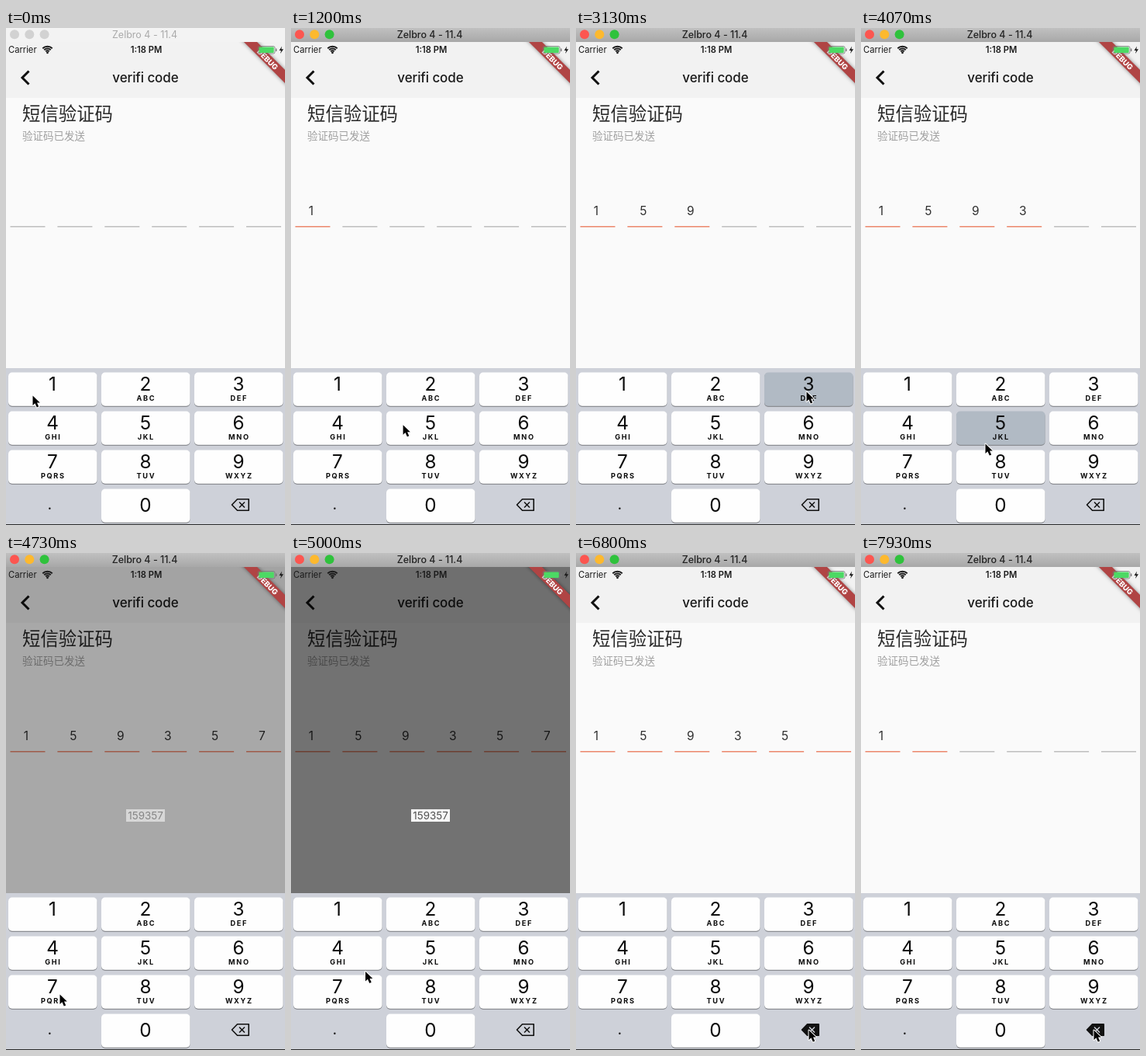
Animation, 360 px wide and 640 px high, one loop 8 s. Source, as an HTML page with a canvas:

```html
<!DOCTYPE html>
<html lang="en">
<head>
<meta charset="utf-8">
<title>verifi code</title>
<style>
html, body { margin: 0; width: 100%; height: 100%; overflow: hidden; background: #fafafa; }
canvas { display: block; width: 360px; height: 640px; }
</style>
</head>
<body>
<canvas id="stage" width="360" height="640"></canvas>
<script>
const ctx = document.getElementById('stage').getContext('2d');
const LOOP = 8000;
const SANS = 'Inter, "Liberation Sans", sans-serif';
const CJK = '"Noto Sans CJK SC", "Noto Sans CJK", sans-serif';
const INK = '#1a1a1a';
const KEYBOARD = '#ced1d9';

const CODE = '159357';
const typedAt = [800, 1600, 2330, 3230, 4120, 4640];
const deletedAt = [6770, 7070, 7350, 7620, 7900];
const windowActiveAt = 450;
const dialogOpen = 4640, dialogClose = 6130, fade = 150;
const keyLetters = ['', 'ABC', 'DEF', 'GHI', 'JKL', 'MNO', 'PQRS', 'TUV', 'WXYZ'];

// time, x, y of the pointer's tip
const pointerPath = [
  [0, 34, 473], [850, 34, 473], [1350, 174, 521], [1650, 174, 521],
  [2080, 287, 570], [2380, 287, 570], [2950, 297, 468], [3300, 297, 468],
  [3900, 160, 535], [4150, 160, 535], [4470, 69, 568], [4850, 69, 568],
  [5500, 263, 352], [6160, 263, 352], [6650, 300, 614], [8000, 300, 614]
];

const clamp = v => Math.max(0, Math.min(1, v));

function pointerAt(t) {
  const i = pointerPath.findIndex(p => p[0] > t);
  const [t0, x0, y0] = pointerPath[i - 1], [t1, x1, y1] = pointerPath[i];
  const k = (t - t0) / (t1 - t0), e = k * k * (3 - 2 * k);
  return [x0 + (x1 - x0) * e, y0 + (y1 - y0) * e];
}

function rect(x, y, w, h, color) {
  ctx.fillStyle = color;
  ctx.fillRect(x, y, w, h);
}

function rounded(x, y, w, h, r, color) {
  ctx.fillStyle = color;
  ctx.beginPath();
  ctx.roundRect(x, y, w, h, r);
  ctx.fill();
}

function disc(x, y, r, color) {
  ctx.fillStyle = color;
  ctx.beginPath();
  ctx.arc(x, y, r, 0, Math.PI * 2);
  ctx.fill();
}

function line(points, color, width, close) {
  ctx.beginPath();
  points.forEach(p => ctx.lineTo(...p));
  if (close) ctx.closePath();
  ctx.strokeStyle = color;
  ctx.lineWidth = width;
  ctx.stroke();
}

function text(str, x, y, size, { weight = 400, color = INK, align = 'center', family = SANS, spacing = 0 } = {}) {
  ctx.font = `${weight} ${size}px ${family}`;
  ctx.letterSpacing = spacing + 'px';
  ctx.textAlign = align;
  ctx.fillStyle = color;
  ctx.fillText(str, x + (align === 'center' ? spacing / 2 : 0), y);
}

function drawTitleBar(active) {
  const shade = ctx.createLinearGradient(0, 0, 0, 18);
  shade.addColorStop(0, '#c0c0c0');
  shade.addColorStop(1, '#a8a8a8');
  rect(0, 0, 360, 18, active ? shade : '#f3f3f3');
  const lights = active ? ['#fc5650', '#fdb92e', '#2fc23c'] : ['#d2d2d2', '#d2d2d2', '#d2d2d2'];
  lights.forEach((c, i) => disc(11 + i * 19.3, 8.3, 6, c));
  text('Zelbro 4 - 11.4', 179, 13, 12.5, { weight: active ? 500 : 400, color: active ? '#222' : '#aaa' });
}

function drawPage(count, lit) {
  rect(0, 18, 360, 420, '#fafafa');
  rect(0, 18, 360, 72, '#f2f2f2');
  line([[29.5, 55.5], [21, 64], [29.5, 72.5]], '#111', 3);
  text('verifi code', 180, 70, 17, { weight: 500, spacing: -0.1 });
  text('短信验证码', 21, 119, 23.4, { align: 'left', family: CJK, color: '#282828' });
  text('验证码已发送', 21, 144, 13.5, { align: 'left', family: CJK, color: '#a0a0a0' });
  for (let i = 0; i < 6; i++) {
    rect(5.5 + i * 60.9, 255, 45, 1.5, i < lit ? '#ec876c' : '#bebebe');
    if (i < count) text(CODE[i], 26 + i * 60.9, 241, 15.5, { color: '#303030' });
  }
}

function drawDialog(alpha) {
  ctx.fillStyle = `rgba(0,0,0,${0.54 * alpha})`;
  ctx.fillRect(0, 18, 360, 420);
  ctx.globalAlpha = alpha;
  rect(155, 330, 50, 16, '#f6f6f6');
  text(CODE, 180, 343, 13.4, { color: '#505050' });
  ctx.globalAlpha = 1;
}

function drawBanner() {
  ctx.save();
  ctx.beginPath();
  ctx.rect(0, 18, 360, 70);
  ctx.clip();
  ctx.translate(360, 18);
  ctx.rotate(Math.PI / 4);
  ctx.shadowColor = 'rgba(0,0,0,.45)';
  ctx.shadowBlur = 5;
  rect(-50, 25.5, 100, 12, '#b04444');
  ctx.shadowBlur = 0;
  text('DEBUG', 0, 35.2, 9.6, { weight: 800, color: '#fff' });
  ctx.restore();
}

function drawStatus() {
  text('Carrier', 3, 32, 11.2, { align: 'left' });
  text('1:18 PM', 181, 32, 11.2, { weight: 600 });
  for (const r of [3.2, 6, 8.8]) {
    ctx.beginPath();
    ctx.arc(53.5, 32.5, r, -Math.PI * 0.75, -Math.PI * 0.25);
    ctx.strokeStyle = INK;
    ctx.lineWidth = 1.9;
    ctx.stroke();
  }
  disc(53.5, 31.8, 1.4, INK);
  ctx.beginPath();
  ctx.roundRect(325, 23.5, 22, 9.5, 2);
  ctx.strokeStyle = '#777';
  ctx.lineWidth = 0.8;
  ctx.stroke();
  rounded(326.3, 24.6, 19.4, 7.4, 1, '#4cd964');
  rect(348, 26.5, 1.3, 3.5, '#777');
  ctx.fillStyle = INK;
  ctx.beginPath();
  [[356, 23.5], [352.5, 29], [355, 29], [354, 33], [358, 27.3], [355.3, 27.3]].forEach(p => ctx.lineTo(...p));
  ctx.fill();
}

function drawKey(label, letters, col, row, pressed) {
  const x = 3 + col * 120, y = 443.5 + row * 50, cx = x + 57;
  rounded(x, y + 1, 114.5, 43.5, 5, '#8b8d92');
  rounded(x, y, 114.5, 43.2, 5, pressed ? '#b1bac4' : '#fefefe');
  text(label, cx, y + (row === 3 ? 29 : 23.4), 24.3, { color: '#0c0c0c' });
  text(letters, cx, y + 36, 9.2, { weight: 700, spacing: 1.7, color: '#0c0c0c' });
}

function drawBackspace(pressed) {
  const shape = [[291.5, 614], [298.5, 606.7], [313.2, 606.7], [313.2, 621.3], [298.5, 621.3]];
  ctx.lineJoin = 'round';
  line(shape, '#111', 1.6, true);
  if (pressed) { ctx.fillStyle = '#111'; ctx.fill(); }
  const cross = pressed ? KEYBOARD : '#111';
  line([[301, 610.5], [308, 617.5]], cross, 1.5);
  line([[308, 610.5], [301, 617.5]], cross, 1.5);
  ctx.lineJoin = 'miter';
}

function drawKeyboard(t) {
  rect(0, 438, 360, 202, KEYBOARD);
  const current = typedAt.findIndex(at => t >= at - 110 && t < at);
  for (let n = 1; n <= 9; n++)
    drawKey(n, keyLetters[n - 1], (n - 1) % 3, Math.floor((n - 1) / 3), CODE[current] === String(n));
  drawKey(0, '', 1, 3, false);
  text('.', 56.5, 620, 20);
  drawBackspace(deletedAt.some(at => t >= at && t < at + 110));
  rect(0, 639, 360, 1, '#2a2a2a');
}

function drawPointer([x, y]) {
  ctx.save();
  ctx.translate(x, y);
  ctx.lineJoin = 'round';
  line([[0.5, 0.5], [0.5, 13], [3.4, 10.3], [5.8, 15.5], [8.2, 14.4], [6, 9.5], [9.8, 9.5]], '#fff', 2, true);
  ctx.fillStyle = '#000';
  ctx.fill();
  ctx.restore();
}

function render(t) {
  const typed = typedAt.filter(at => t >= at).length;
  const deleted = deletedAt.filter(at => t >= at).length;
  const count = typed - deleted;
  const dim = clamp((t - dialogOpen) / fade) * clamp(1 - (t - dialogClose) / fade);
  // The slot just emptied keeps its highlight.
  drawPage(count, count + (deleted ? 1 : 0));
  if (dim) drawDialog(dim);
  drawBanner();
  drawStatus();
  drawTitleBar(t >= windowActiveAt);
  drawKeyboard(t);
  drawPointer(pointerAt(t));
}

function tick() {
  render(performance.now() % LOOP);
  requestAnimationFrame(tick);
}
tick();
</script>
</body>
</html>
```
